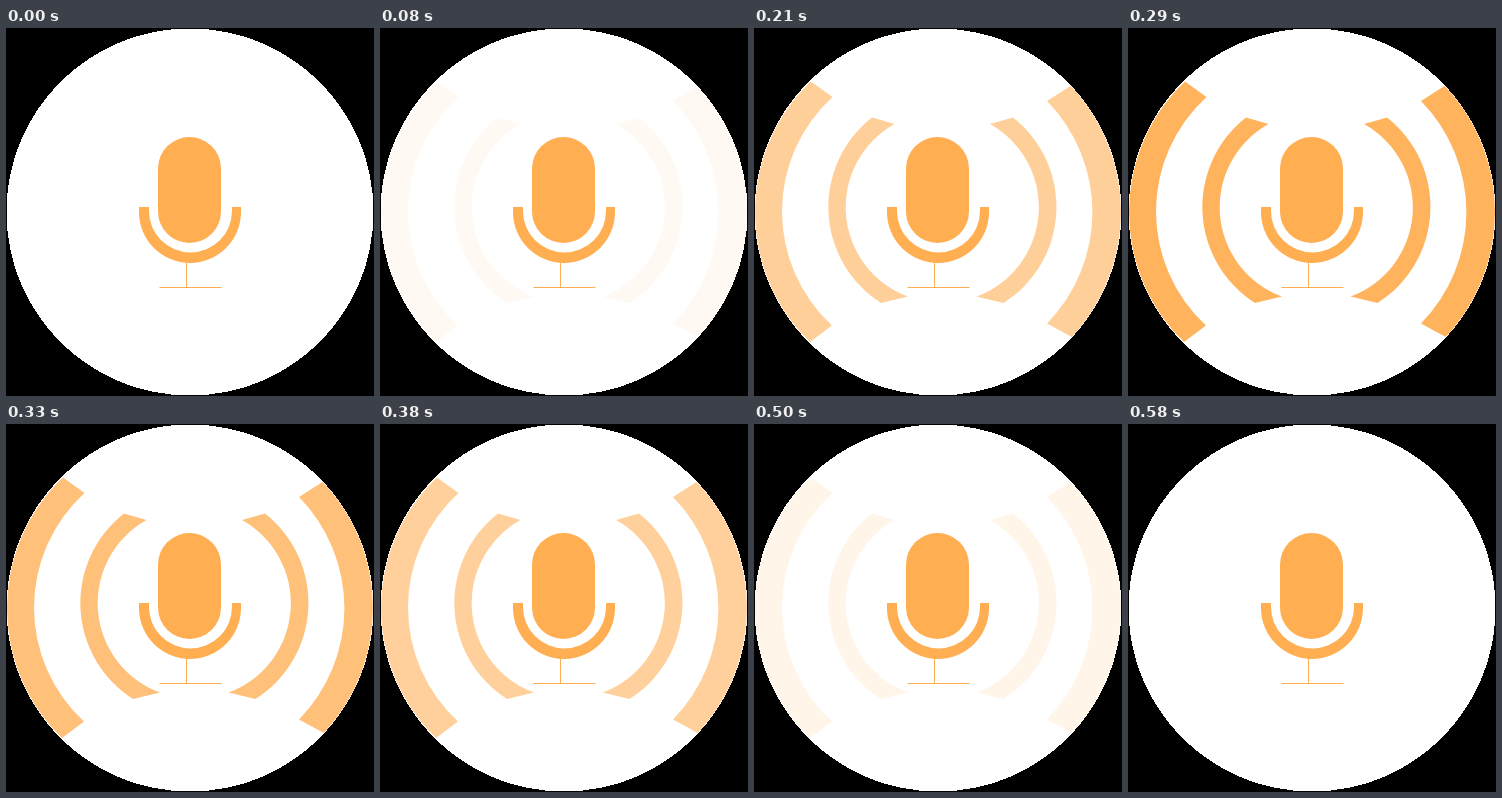
Animation of 368x368 px, one loop 620 ms. Source, as an HTML page:

```html
<!DOCTYPE html>
<html lang="en">
<head>
<meta charset="utf-8">
<title>Microphone pulse</title>
<style>
  html, body { margin: 0; height: 100%; overflow: hidden; background: #000; }
  svg { display: block; width: 368px; height: 368px; }
</style>
</head>
<body>
<svg viewBox="0 0 368 368" fill="#ffae52">
  <clipPath id="disc"><circle cx="184" cy="184" r="183"/></clipPath>
  <circle cx="184" cy="184" r="183.5" fill="#fff" shape-rendering="crispEdges"/>
  <g id="waves" clip-path="url(#disc)" opacity="0">
    <path d="M57 53.5A180 180 0 0 0 56 314L78 297.5A155 155 0 0 1 78.5 69Z"/>
    <path d="M318 57A188 188 0 0 1 319.5 310L293 295.5A159 159 0 0 0 293 73Z"/>
    <path d="M118 89.5A113.7 113.7 0 0 0 127 275L154 268.5A95.2 95.2 0 0 1 140.5 96Z"/>
    <path d="M259 89.5A113.7 113.7 0 0 1 249.5 275L222.5 268.5A95.2 95.2 0 0 0 236 96Z"/>
  </g>
  <rect x="152" y="109" width="63" height="106" rx="31.5"/>
  <path d="M133 179H143V183A41.5 41.5 0 0 0 226 183V179H235V184A51 51 0 0 1 133 184Z"/>
  <path d="M180 234h1v25h-1zM153.5 259h62v1h-62z"/>
</svg>
<script>
  const LOOP = 620, TICKS_PER_MS = 24 / 1000;
  const FIRST = 2, LAST = 12, END = 14;
  const waves = document.getElementById('waves');

  // Linear rise, eased fall; the final pose holds until the waves vanish
  function opacityAt(tick) {
    if (tick < FIRST || tick >= END) return 0;
    const k = Math.min(tick, LAST);
    const rise = (k - 1.6) * 0.173;
    const fall = ((13.62 - k) * 0.148) ** 1.45;
    return Math.min(rise, fall);
  }

  function draw() {
    const t = performance.now() % LOOP;
    // 24 ticks per second, each starting on the nearest 10 ms
    const tick = Math.floor((Math.floor(t / 10) * 10 + 4.9) * TICKS_PER_MS);
    waves.setAttribute('opacity', opacityAt(tick));
    requestAnimationFrame(draw);
  }
  draw();
</script>
</body>
</html>
```
